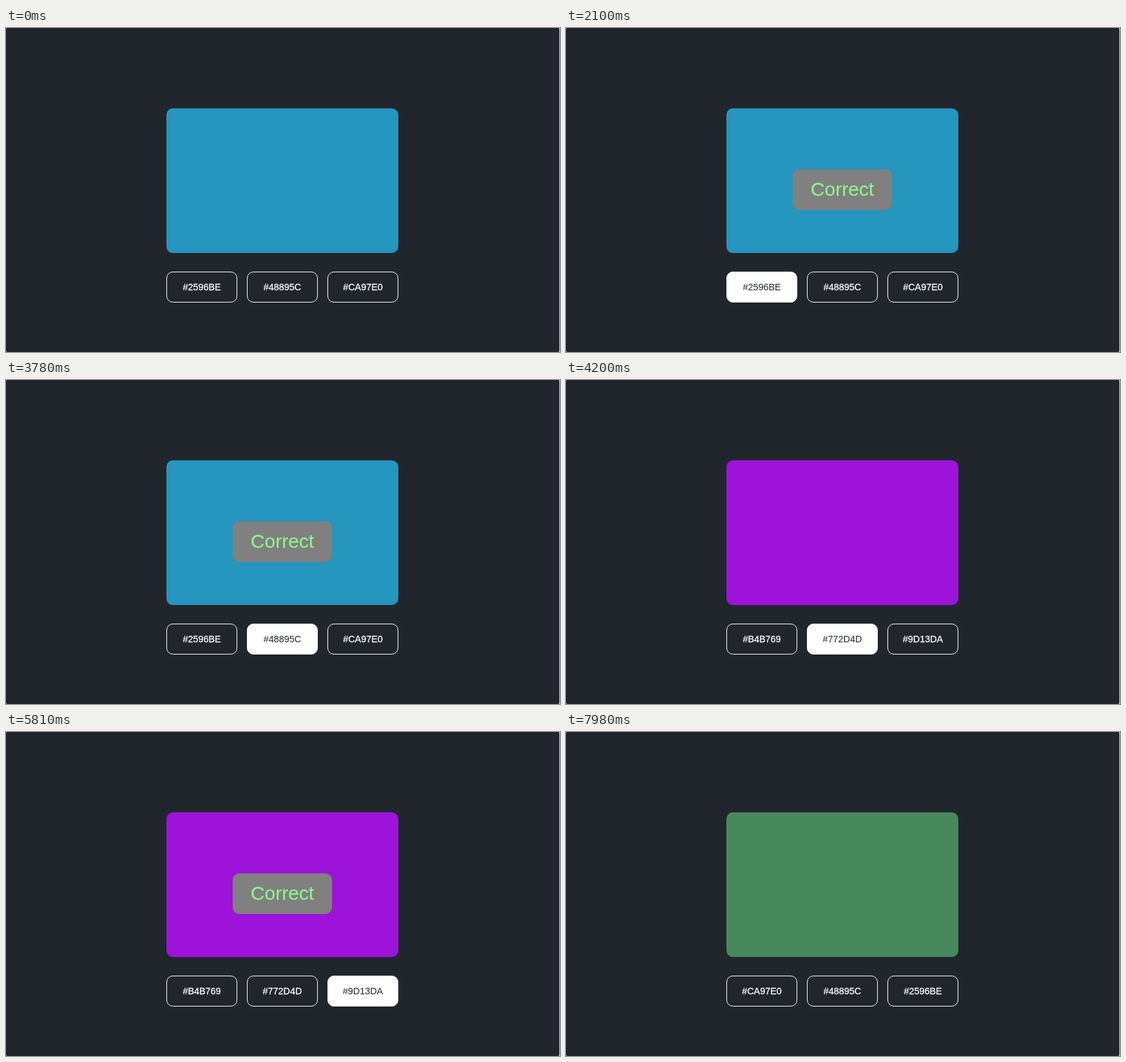
An HTML page that plays this animation: 860x504 px, repeating every 8000 ms.

```html
<!DOCTYPE html>
<html lang="en">
<head>
<meta charset="utf-8">
<title>Guess the colour</title>
<style>
  :root { --dark: #21262d; --loop: 8s step-end infinite; }
  * { box-sizing: border-box; }
  html, body { margin: 0; width: 100%; height: 100%; overflow: hidden; background: #d4d5d7; }
  body { position: relative; font-family: "Liberation Sans", Arial, sans-serif; }

  .page {
    position: absolute; left: 0; top: 0; width: 859px; height: 504px;
    background: var(--dark); border-radius: 2px;
  }
  .swatch, .option, .popup { position: absolute; border-radius: 10px; }
  .swatch {
    left: 249px; top: 125px; width: 360px; height: 225px;
    animation: swatch var(--loop);
  }
  .option {
    left: var(--x); top: 379px; width: 110px; height: 48px;
    border: 1px solid #fff; color: #fff;
    font-size: 14.4px; line-height: 46px; text-align: center;
    -webkit-text-stroke: .3px;
  }
  .option span { position: absolute; inset: 0; visibility: hidden; }
  .option span:nth-child(1) { animation: round1 var(--loop); }
  .option span:nth-child(2) { animation: round2 var(--loop); }
  .option span:nth-child(3) { animation: round3 var(--loop); }
  .first  { --x: 249px; animation: hover1 var(--loop); }
  .second { --x: 374px; animation: hover2 var(--loop); }
  .third  { --x: 499px; animation: hover3 var(--loop); }

  .popup {
    left: 352px; top: 220px; width: 154px; height: 63px;
    background: #808080; color: #90ee90;
    font-size: 30px; line-height: 62px; text-align: center;
    -webkit-text-stroke: .3px;
    box-shadow: 0 0 2px rgba(128, 128, 128, .5);
    visibility: hidden; animation: popup var(--loop);
  }

  @keyframes swatch {
    0% { background: #2596be; }
    52.5% { background: #9d13da; }
    99.75%, 100% { background: #48895c; }
  }
  @keyframes round1 {
    0% { visibility: visible; }
    52.5%, 100% { visibility: hidden; }
  }
  @keyframes round2 {
    0%, 99.75%, 100% { visibility: hidden; }
    52.5% { visibility: visible; }
  }
  @keyframes round3 {
    0% { visibility: hidden; }
    99.75%, 100% { visibility: visible; }
  }
  @keyframes popup {
    0%, 52.5%, 99.75%, 100% { visibility: hidden; }
    26.25%, 72.625% { visibility: visible; }
  }
  @keyframes hover1 {
    0%, 32.375%, 100% { background: transparent; color: #fff; -webkit-text-stroke-width: .3px; }
    14.875% { background: #fff; color: var(--dark); -webkit-text-stroke-width: 0; }
  }
  @keyframes hover2 {
    0%, 63.875%, 100% { background: transparent; color: #fff; -webkit-text-stroke-width: .3px; }
    47.25% { background: #fff; color: var(--dark); -webkit-text-stroke-width: 0; }
  }
  @keyframes hover3 {
    0%, 82.25%, 100% { background: transparent; color: #fff; -webkit-text-stroke-width: .3px; }
    64.75% { background: #fff; color: var(--dark); -webkit-text-stroke-width: 0; }
  }
</style>
</head>
<body>
  <div class="page">
    <div class="swatch"></div>
    <div class="popup">Correct</div>
    <div class="option first"><span>#2596BE</span><span>#B4B769</span><span>#CA97E0</span></div>
    <div class="option second"><span>#48895C</span><span>#772D4D</span><span>#48895C</span></div>
    <div class="option third"><span>#CA97E0</span><span>#9D13DA</span><span>#2596BE</span></div>
  </div>
</body>
</html>
```
